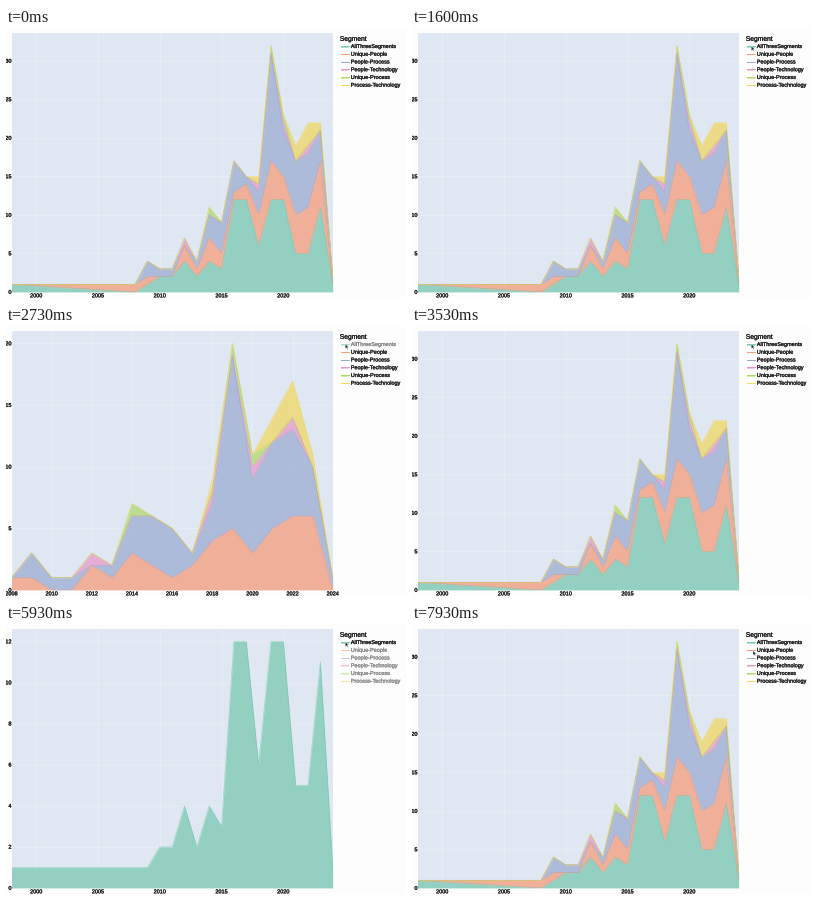
These frames come from a looping animation (400x270 px, 8 s). A matplotlib script:

```python
import numpy as np
import matplotlib.pyplot as plt
from matplotlib.animation import FuncAnimation
from matplotlib.patches import Polygon, Rectangle
from matplotlib.patheffects import withStroke

W, H, DPI = 400, 270, 100
LOOP, STEP = 8000, 40
PX = 72 / DPI
LEFT, RIGHT, TOP, BOTTOM = 5.5, 326.7, 4.5, 264
INK = "#1c1c1c"

plt.rcParams.update({"font.family": "Liberation Sans", "text.hinting": "none"})

# Yearly counts: a run from 2008 on, or only the years that are not zero.
SERIES = [
    ("AllThreeSegments", "#66c2a5", [0, 1, 2, 2, 4, 2, 4, 3, 12, 12, 6, 12, 12, 5, 5, 11, 1]),
    ("Unique-People", "#fc8d62", [1, 1, 0, 0, 2, 1, 3, 2, 1, 2, 4, 5, 3, 5, 6, 6, 0]),
    ("People-Process", "#8da0cb", [0, 2, 1, 1, 0, 1, 3, 4, 4, 1, 3, 14, 6, 7, 7, 4, 1]),
    ("People-Technology", "#e78ac3", dict.fromkeys([2012, 2018, 2020, 2022], 1)),
    ("Unique-Process", "#a6d854", dict.fromkeys([2014, 2019, 2020], 1)),
    ("Process-Technology", "#f3d546", {2018: 1, 2021: 2, 2022: 3, 2023: 1}),
]
YEARS = np.array([1998, *range(2008, 2025)])


def counts(values):
    if isinstance(values, list):
        values = dict(enumerate(values, 2008))
    return [values.get(year, 0) for year in YEARS]


COUNTS = np.array([counts(values) for _, _, values in SERIES])
COUNTS[0, 0] = 1

fig = plt.figure(figsize=(W / DPI, H / DPI), dpi=DPI, facecolor="#fdfdfd")
ax = fig.add_axes([0, 0, 1, 1])
ax.set(xlim=(0, W), ylim=(H, 0))
ax.axis("off")

panel = Rectangle((LEFT, TOP), RIGHT - LEFT, BOTTOM - TOP, fc="#dfe7f2", lw=0, zorder=0)
ax.add_patch(panel)


def label(x, y, s, size=5.5, color=INK, **kw):
    return ax.text(x, y, s, fontsize=size * PX, color=color, va="center_baseline",
                   path_effects=[withStroke(linewidth=0.28 * PX, foreground=color)], **kw)


def rule(xs, ys, color, width, **kw):
    return ax.plot(xs, ys, color=color, lw=width * PX, **kw)[0]


def grid(xs, ys):
    return rule(xs, ys, "white", 0.7, alpha=0.3, zorder=1)


def build_legend(shown):
    arts = []
    for i, (name, color, _) in enumerate(SERIES):
        y = 18.2 + 7.74 * i
        on = i in shown
        fade = 0.8 if on else 0.4
        swatch = Rectangle((334.7, y), 8.6, 1.5, fc=color, lw=0, alpha=0.6 * fade)
        arts.append(ax.add_patch(swatch))
        arts.append(rule([334.7, 343.3], [y, y], color, 1, alpha=fade))
        arts.append(label(344.8, y, name, color=INK if on else "#8c8c8c", ha="left"))
    return arts


def build_view(shown, x_step, y_step):
    """Stacked areas, axes and legend for the given visible series."""
    arts = build_legend(shown)
    data = COUNTS[shown]
    used = data.any(axis=0)
    years, data = YEARS[used], data[:, used]
    tops = data.cumsum(axis=0)
    first, last = years[0], years[-1]
    y_max = tops[-1].max() / 0.95

    def px(year):
        return LEFT + (year - first) / (last - first) * (RIGHT - LEFT)

    def py(v):
        return BOTTOM - v / y_max * (BOTTOM - TOP)

    for year in range(-(-first // x_step) * x_step, last + 1, x_step):
        arts.append(grid([px(year)] * 2, [TOP, BOTTOM]))
        arts.append(label(px(year), 267.5, str(year), ha="center"))
    for v in range(0, int(y_max) + 1, y_step):
        arts.append(grid([LEFT, RIGHT], [py(v)] * 2))
        arts.append(label(5.5, py(v), str(v), ha="right"))

    base = np.zeros(len(years))
    for i, top in zip(shown, tops):
        color = SERIES[i][1]
        arts.append(ax.fill_between(px(years), py(base), py(top), color=color,
                                    alpha=0.62, lw=0, zorder=2))
        line = rule(px(years), py(top), color, 0.6, alpha=0.6, zorder=3)
        line.set_clip_path(panel)
        arts.append(line)
        base = top
    return arts


label(333.8, 10.3, "Segment", 6.7, ha="left")
VIEWS = {
    "all": build_view([0, 1, 2, 3, 4, 5], 5, 5),
    "rest": build_view([1, 2, 3, 4, 5], 2, 5),
    "solo": build_view([0], 5, 2),
}
CLICKS = [(0, "all"), (1760, "rest"), (3320, "all"), (4720, "solo"), (6640, "all")]

ARROW = np.array([[0, 0], [0, 4.6], [1.1, 3.7], [1.9, 5.3], [2.6, 4.9], [1.9, 3.4], [3.3, 3.2]])
cursor = ax.add_patch(Polygon(ARROW, fc="#1c2a2c", ec="white", lw=0.3 * PX, zorder=9))


def update(n):
    t = n * STEP
    view = [name for start, name in CLICKS if start <= t][-1]
    for name, arts in VIEWS.items():
        for art in arts:
            art.set_visible(name == view)
    k = np.clip((t - 7400) / 400, 0, 1)
    k = k * k * (3 - 2 * k)
    cursor.set_xy(ARROW + [339.3 + 1.7 * k, 18 + 8.6 * k])
    cursor.set_visible(t >= 680)
    return []


anim = FuncAnimation(fig, update, frames=LOOP // STEP, interval=STEP,
                     init_func=lambda: update(0), repeat=True, repeat_delay=0, blit=False)
plt.show()
```
